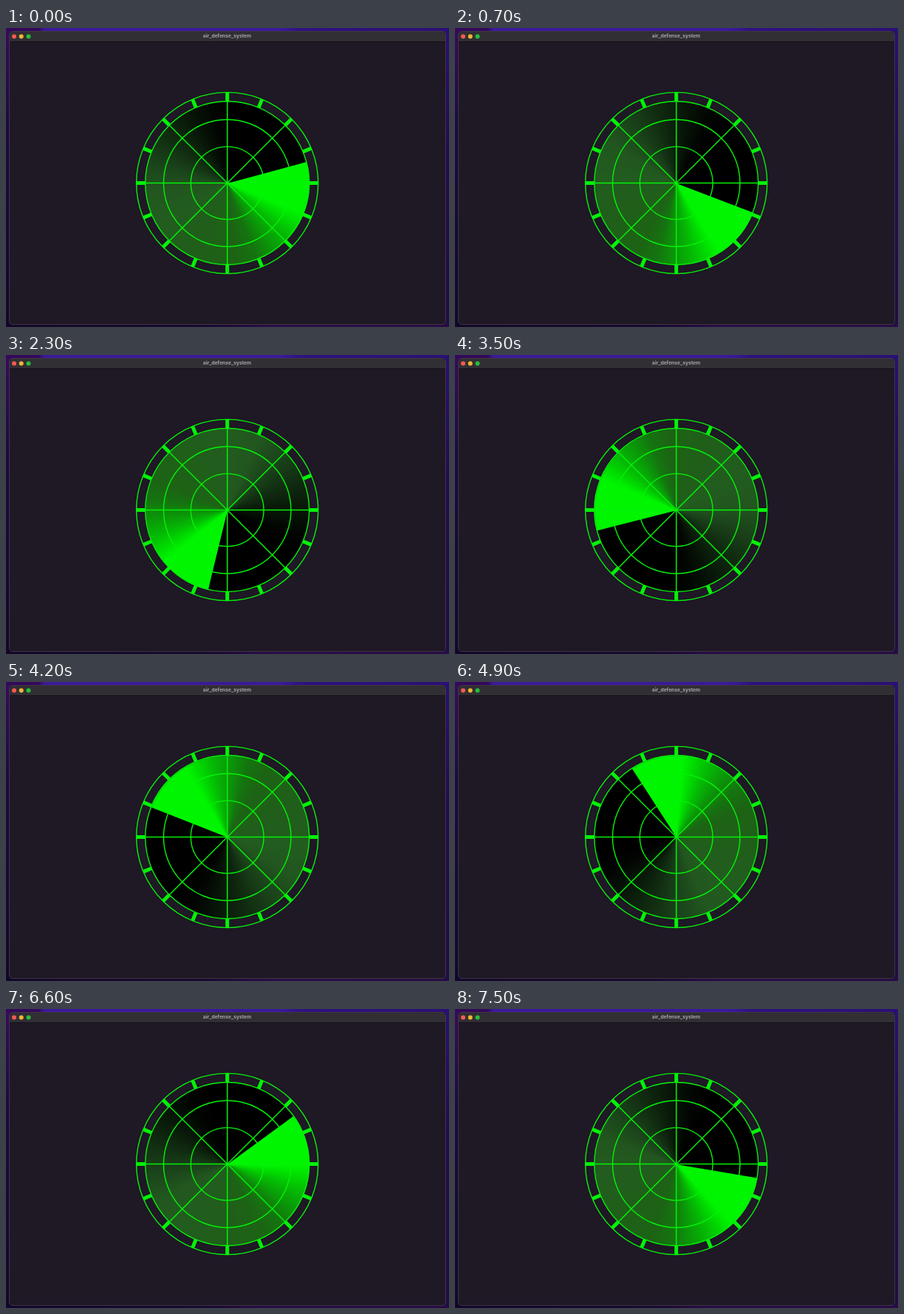
An HTML page for the animation above (7.6 s loop, 600 by 406 pixels).

```html
<!DOCTYPE html>
<html lang="en">
<head>
<meta charset="utf-8">
<title>Radar sweep</title>
<style>
  html, body { margin: 0; width: 100%; height: 100%; overflow: hidden; background: #1a0a38; }
  #stage { position: absolute; left: 0; top: 0; width: 600px; height: 406px; overflow: hidden; }
  #stage > * { position: absolute; }
  .desk-top { left: 0; top: 0; width: 600px; height: 6px;
    background: linear-gradient(90deg, #34085a 0 44px, #3a1a9a 52px, #3a1a9c 370px, #2e1280 400px, #2a1074 600px); }
  .desk-left { left: 0; top: 4px; width: 6px; height: 402px;
    background: linear-gradient(#380a5c, #1c0a42 30%, #12072a); }
  .desk-right { right: 0; top: 4px; width: 6px; height: 402px;
    background: linear-gradient(#2a1070, #220c4e 40%, #220c44); }
  .desk-bottom { left: 0; top: 401px; width: 600px; height: 5px;
    background: linear-gradient(90deg, #12072a, #180930 45%, #2a0c48 60%, #280c46); }
  .window { left: 4px; top: 4px; width: 592px; height: 399px; box-sizing: border-box;
    border: 1px solid #3c3742; border-radius: 5px; background: #1f1825; overflow: hidden; }
  .bar { height: 13px; background: #312e34; border-bottom: 1px solid #151119; }
  #sweep { left: 188.7px; top: 99.5px; width: 222px; height: 222px; border-radius: 50%;
    background: conic-gradient(from 90deg,
      #00f500 0deg, #00f500 37deg, #00de00 45deg, #04bc04 56deg, #0a9808 70deg,
      #14740f 84deg, #1c6414 98deg, #205e1a 130deg, #225c1f 165deg, #22561f 190deg,
      #1a421a 212deg, #102a10 235deg, #071407 258deg, #020502 275deg,
      #000 290deg, #000 359.7deg, #00f500 360deg); }
  svg { left: 0; top: 0; }
  .title { font: 700 6.7px Inter, "Open Sans", sans-serif; fill: #a5a2a8; text-anchor: middle; }
</style>
</head>
<body>
<div id="stage">
  <div class="desk-top"></div>
  <div class="desk-left"></div>
  <div class="desk-right"></div>
  <div class="desk-bottom"></div>
  <div class="window"><div class="bar"></div></div>
  <div id="sweep"></div>
  <svg width="600" height="406" viewBox="0 0 600 406">
    <circle cx="11" cy="11.5" r="3" fill="#f25a53"/>
    <circle cx="20.7" cy="11.5" r="3" fill="#f0b530"/>
    <circle cx="30.5" cy="11.5" r="3" fill="#28bc3c"/>
    <text class="title" x="299.5" y="13.4">air_defense_system</text>
    <g id="grid" transform="translate(299.7 210.5)" fill="none" stroke="#04f208"></g>
  </svg>
</div>
<script>
  const LOOP = 7600, STEP = 100;
  const grid = document.getElementById('grid');

  function add(tag, attrs) {
    const el = document.createElementNS('http://www.w3.org/2000/svg', tag);
    for (const key in attrs) el.setAttribute(key, attrs[key]);
    grid.append(el);
  }

  function ray(angle, from, to, width) {
    add('line', { x1: from, x2: to, transform: `rotate(${angle})`, 'stroke-width': width });
  }

  for (const r of [49.4, 86.3, 111, 123.1]) add('circle', { r, 'stroke-width': 1.4 });
  for (let i = 0; i < 8; i++) ray(i * 45, 0, 111, 1.5);
  for (let i = 0; i < 16; i++) ray(i * 22.5, 111, 123, 5);

  // The sweep ticks ten times a second and slows slightly in its second half.
  const easing = `steps(${LOOP / STEP / 2}, end)`;
  document.getElementById('sweep').animate(
    [-15.2, 181.2, 374.7].map(angle => ({ transform: `rotate(${angle}deg)`, easing })),
    { duration: LOOP, iterations: Infinity }
  );
</script>
</body>
</html>
```
